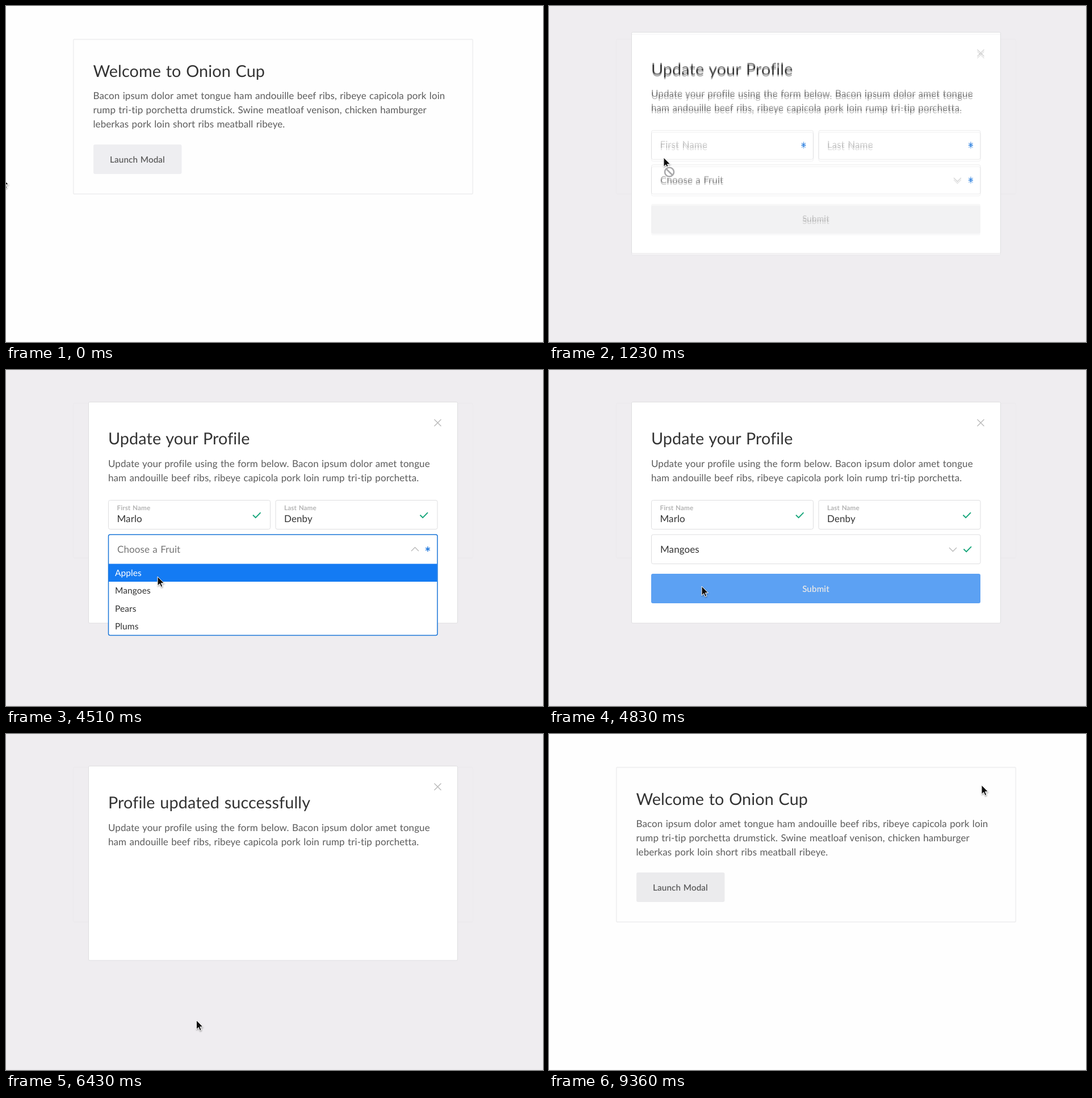
Animation, 946 px wide and 592 px high, one loop 9860 ms. Source, as an HTML page:

```html
<!DOCTYPE html>
<html lang="en">
<head>
<meta charset="utf-8">
<title>Profile modal</title>
<style>
  html, body { margin: 0; width: 100%; height: 100%; overflow: hidden; background: #fefefe; }
  svg { display: block; width: 946px; height: 592px; }
  text {
    font: 17px Lato, "Open Sans", sans-serif; fill: #5c5c5c; letter-spacing: .08px;
    word-spacing: .9px; text-rendering: geometricPrecision; white-space: pre;
  }
  .title { font-size: 28.8px; fill: #333; letter-spacing: .1px; word-spacing: 1.2px; }
  .button { font-size: 15.2px; font-weight: 600; text-anchor: middle; letter-spacing: .1px; }
  .value { fill: #333; }
  .option { font-size: 15.5px; fill: #333; }
  .box { fill: #fff; stroke: #dedee0; }
  .line { fill: none; stroke-width: 1.3; stroke: #b8b8b8; }
  .check { fill: none; stroke: #16a67a; stroke-width: 1.9; }
  .star { fill: none; stroke: #2079de; stroke-width: 1.5; }
</style>
</head>
<body>
<svg viewBox="0 0 946 592">
  <defs>
    <filter id="shade" x="-50%" y="-50%" width="220%" height="220%">
      <feDropShadow dx="0.5" dy="1.5" stdDeviation="1.2" flood-opacity=".4"/>
    </filter>
  </defs>
  <rect width="946" height="592" fill="#fefefe"/>
  <rect x="118.75" y="58.75" width="703.5" height="272.5" rx="2" fill="#fefefe" stroke="#f0f0f1" stroke-width="1.8"/>
  <text class="title" x="153.5" y="125">Welcome to Onion Cup</text>
  <text x="153.5" y="164">Bacon ipsum dolor amet tongue ham andouille beef ribs, ribeye capicola pork loin</text>
  <text x="153.5" y="189">rump tri-tip porchetta drumstick. Swine meatloaf venison, chicken hamburger</text>
  <text x="153.5" y="214">leberkas pork loin short ribs meatball ribeye.</text>
  <rect id="launch" x="154" y="244" width="155.5" height="52" rx="3"/>
  <text class="button" x="231.5" y="275.5">Launch Modal</text>

  <rect id="overlay" width="946" height="592" fill="#edebee"/>
  <path d="M0 591.5H946" stroke="#000" stroke-opacity=".03"/>

  <g id="modal">
    <rect id="panel" class="box" x="145.5" y="56.5" width="650" rx="2"/>
    <path class="line" d="M754.5 87l12 12m0-12l-12 12"/>
    <text id="title" class="title" x="180" y="131"></text>
    <text x="180" y="170.5">Update your profile using the form below. Bacon ipsum dolor amet tongue</text>
    <text x="180" y="195.5">ham andouille beef ribs, ribeye capicola pork loin rump tri-tip porchetta.</text>
    <g id="form">
      <g id="first"></g>
      <g id="last"></g>
      <rect id="glow" x="179" y="358" width="582" height="54" rx="4" fill="none" stroke="#9cc8f6" stroke-width="3"/>
      <rect id="submit" x="180" y="359" width="580" height="52" rx="3"/>
      <text id="submitText" class="button" x="470" y="390.5">Submit</text>
      <rect id="select" class="box" x="180.5" y="290" width="579.5" rx="3"/>
      <text id="fruit" x="196" y="322"></text>
      <path id="chevron" class="line"/>
      <g id="fruitMark"></g>
      <g id="menu"></g>
    </g>
    <g id="spinner" fill="none" stroke-width="3">
      <circle cx="470" cy="342" r="20" stroke="#e6e6e8"/>
      <path id="arc" d="M470 322a20 20 0 0 1 20 20" stroke="#1677e6" stroke-linecap="round"/>
    </g>
  </g>
  <use id="ghost" href="#modal"/>

  <g id="cursor">
    <g id="arrow" filter="url(#shade)">
      <path d="M0 0V16.2L3.7 12.7 6.2 18.4 8.8 17.2 6.4 11.7H11.6Z" fill="#111" stroke="#fff" stroke-width="1"/>
    </g>
    <g id="blocked" fill="none">
      <path id="ring" d="M18 25.5a8 8 0 1 1-16 0a8 8 0 1 1 16 0M4.5 20l11 11" stroke="#fff" stroke-width="5"/>
      <use href="#ring" stroke="#999"/>
      <path d="M18 25.5a8 8 0 1 1-16 0a8 8 0 1 1 16 0M4.5 20l11 11" stroke="#a9a9ab" stroke-width="2.6"/>
    </g>
    <path id="beam" d="M-3-8q3 0 3 2V6q0 2-3 2M3-8q-3 0-3 2M0 6q0 2 3 2" fill="none" stroke="#333"/>
  </g>
</svg>
<script>
const LOOP = 9860, BLUE = '#1a76d8', ROW = 31.5, MENU_TOP = 341.5;
const FRUITS = ['Apples', 'Mangoes', 'Pears', 'Plums'];
const $ = id => document.getElementById(id);
const set = (el, attrs) => { for (const k in attrs) el.setAttribute(k, attrs[k]); };
const show = (el, on) => { el.style.display = on ? '' : 'none'; };
const ramp = (t, from, to) => Math.min(1, Math.max(0, (t - from) / (to - from)));
const within = (t, from, to) => t >= from && t < to;
const mix = (a, b, p) => a + (b - a) * p;
const mixColor = (a, b, p) => `rgb(${a.map((v, i) => Math.round(mix(v, b[i], p)))})`;

const check = (x, y) => `<path class="check" d="M${x - 7} ${y}l4.7 4.7 8.8-9"/>`;
const star = (x, y) => `<path class="star" d="M${x} ${y - 4.5}v9M${x - 3.8} ${y - 2.2}l7.6 4.4m0-4.4l-7.6 4.4"/>`;

// Time, x and y of the pointer's stops
const STOPS = [
  [70, -7, 303], [700, 202, 267], [3800, 202, 267], [4200, 262, 322], [4420, 262, 322],
  [4510, 267, 364], [4570, 269, 381], [5060, 269, 381], [5210, 303, 397], [5500, 303, 397],
  [6370, 330, 450], [6520, 345, 600], [8520, 769, 84], [8700, 762, 90]
];

function pointer(t) {
  const i = STOPS.findIndex(s => s[0] > t);
  if (i === 0) return STOPS[0].slice(1);
  if (i < 0) return STOPS[STOPS.length - 1].slice(1);
  const a = STOPS[i - 1], b = STOPS[i], p = ramp(t, a[0], b[0]), e = p * p * (3 - 2 * p);
  return [mix(a[1], b[1], e), mix(a[2], b[2], e)];
}

function makeField(id, x, label, word, focus, blur, start) {
  const g = $(id);
  g.innerHTML = `<rect class="box" x="${x + .5}" y="229.5" width="285" height="51" rx="3"/>
    <text x="${x + 15.5}">${label}</text><text class="value" x="${x + 15.5}" y="268"></text>
    <path stroke="#222"/><g>${star(x + 268.5, 254)}</g><g>${check(x + 262, 255.5)}</g>`;
  const [box, name, value, caret, need, ok] = g.children;
  return t => {
    const focused = within(t, focus, blur), filled = t >= start;
    const count = filled ? Math.floor((t - start) / 115) + 1 : 0;
    const p = ramp(t, start, start + 100);
    box.style.stroke = focused ? BLUE : '';
    box.style.strokeWidth = focused ? 1.5 : 1;
    set(name, { y: mix(260.5, 247, p) });
    name.style.fontSize = mix(17, 11.7, p) + 'px';
    name.style.fontWeight = filled ? 700 : 400;
    name.style.fill = focused && filled ? BLUE : '#b4b4b4';
    value.textContent = word.slice(0, count);
    const end = x + 16 + (count ? value.getComputedTextLength() : 0);
    set(caret, { d: `M${end} 252v21` });
    show(caret, focused);
    show(need, !filled);
    show(ok, filled);
  };
}

const fields = [
  makeField('first', 180, 'First Name', 'Marlo', 1700, 2690, 1910),
  makeField('last', 474.5, 'Last Name', 'Denby', 2690, 3640, 2890)
];

$('menu').innerHTML = `<rect x="181" y="${MENU_TOP}" width="578.5" height="${ROW}" fill="#147bf3"/>` +
  FRUITS.map((f, i) => `<text class="option" x="192" y="${362.5 + i * ROW}">${f}</text>`).join('');
const [rowMark, ...options] = $('menu').children;
$('fruitMark').innerHTML = `<g>${star(743, 315.5)}</g><g>${check(737.5, 315.5)}</g>`;

function drawSelect(t, y) {
  const focused = within(t, 3640, 4800), open = within(t, 4150, 4800), chosen = t >= 4800;
  set($('select'), { height: open ? 177.5 : 51.5 });
  $('select').style.stroke = focused ? BLUE : '';
  $('select').style.strokeWidth = focused ? 1.5 : 1;
  $('fruit').textContent = chosen ? FRUITS[1] : 'Choose a Fruit';
  $('fruit').style.fill = chosen ? '#333' : '#757575';
  set($('chevron'), {
    d: open ? 'M714 319l6.5-6.5 6.5 6.5' : `M${chosen ? 705 : 713} 313l6.5 6.5 6.5-6.5`
  });
  show($('fruitMark').children[0], !chosen);
  show($('fruitMark').children[1], chosen);
  show($('menu'), open);
  const row = Math.floor((y - MENU_TOP) / ROW);
  show(rowMark, row >= 0);
  set(rowMark, { y: MENU_TOP + Math.max(0, row) * ROW });
  options.forEach((o, i) => { o.style.fill = i === row ? '#fff' : ''; });
}

function drawSubmit(t) {
  const on = ramp(t, 4770, 4860), hover = ramp(t, 5060, 5210);
  const blue = [mix(20, 13, hover), mix(123, 112, hover), mix(243, 224, hover)];
  set($('submit'), { fill: mixColor([242, 242, 243], blue, on) });
  $('submitText').style.fill = mixColor([180, 180, 180], [255, 255, 255], on);
  show($('glow'), t >= 5400);
}

function drawModal(t) {
  const drop = time => -44 * (1 - ramp(time, 1000, 1600)) ** 3;
  const leave = ramp(t, 9000, 9360);
  const y = drop(t) - 20 * leave;
  const alpha = ramp(t, 1000, 1200) * (1 - leave);
  const done = t >= 6400;
  set($('overlay'), { opacity: .87 * ramp(t, 900, 1200) * (1 - leave) });
  set($('modal'), { transform: `translate(0 ${y})`, opacity: alpha });
  set($('panel'), { height: mix(389.5, 207.5, ramp(t, 6400, 6520)) });
  $('title').textContent = done ? 'Profile updated successfully' : 'Update your Profile';
  set($('form'), { opacity: 1 - ramp(t, 5410, 5600) });
  show($('form'), !done);
  set($('spinner'), { opacity: ramp(t, 5480, 5620) });
  show($('spinner'), within(t, 5480, 6400));
  set($('arc'), { transform: `rotate(${(t - 5480) * .5} 470 342)` });
  // A soft trailing copy while the panel drops in
  show($('ghost'), within(t, 1000, 1600));
  set($('ghost'), { y: drop(t + 45) - drop(t), opacity: .4 });
}

function drawCursor(t, x, y) {
  const beam = within(t, 1500, 1910);
  show($('cursor'), !within(t, 1910, 3800) && !within(t, 6520, 8520));
  set($('cursor'), { transform: `translate(${x} ${y})` });
  show($('arrow'), !beam);
  show($('beam'), beam);
  show($('blocked'), within(t, 1050, 1500));
}

function draw(now) {
  const t = (now - begin) % LOOP, [x, y] = pointer(t);
  const hover = within(t, 650, 900);
  set($('launch'), { fill: within(t, 900, 9000) ? '#d6d6da' : hover || t >= 9000 ? '#ebebed' : '#eeeef1' });
  fields.forEach(f => f(t));
  drawSelect(t, y);
  drawSubmit(t);
  drawModal(t);
  drawCursor(t, x, y);
}

const begin = performance.now();
function tick() {
  draw(performance.now());
  requestAnimationFrame(tick);
}
tick();
</script>
</body>
</html>
```
